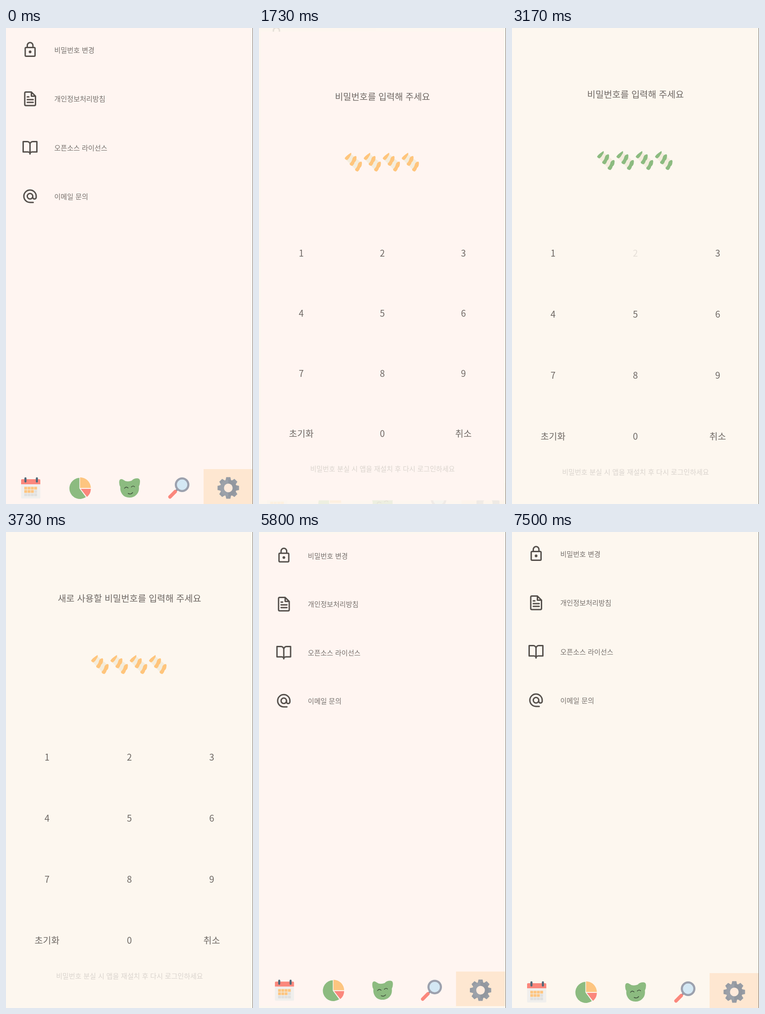
Animation, 540 px wide and 1037 px high, one loop 7530 ms. Source, as an HTML page:

```html
<!DOCTYPE html>
<html lang="ko">
<head>
<meta charset="utf-8">
<style>
html, body { margin: 0; width: 100%; height: 100%; overflow: hidden; background: #fdf7ef; }
svg { display: block; width: 100vw; height: 100vh; }
text { font-family: 'Noto Sans CJK KR', 'Noto Sans CJK JP', 'Noto Sans CJK', sans-serif; fill: #6e6864; }
.row { font-size: 15.2px; fill: #77716d; }
.key, .prompt { font-size: 19.8px; text-anchor: middle; }
.hint { font-size: 15.1px; text-anchor: middle; fill: #dad4ce; }
.line { fill: none; stroke: #55504c; stroke-width: 3; stroke-linejoin: round; stroke-linecap: round; }
</style>
</head>
<body>
<svg viewBox="0 0 540 1037" preserveAspectRatio="none">
  <defs>
    <linearGradient id="steel">
      <stop offset=".5" stop-color="#9ca1a9"/><stop offset=".5" stop-color="#92979f"/>
    </linearGradient>
    <path id="band" d="M25 7Q18 8 17 14Q16 19 11 24Q11 28 17 29Q21 26 22 21Q26 18 26 13Q27 9 25 7Z"/>
  </defs>

  <g id="settings">
    <rect class="bg" width="540" height="1037"/>
    <g class="line">
      <rect x="42" y="42.5" width="21.5" height="19" rx="2"/>
      <path d="M46.5 42V38a6.2 6.2 0 0 1 12.4 0V42"/>
      <circle cx="52.7" cy="52" r="1.5"/>
      <path d="M43.5 139.5H55.5L64.5 148.5V166.5Q64.5 169 62 169H43.5Q41 169 41 166.5V142Q41 139.5 43.5 139.5ZM55.5 140V148.5H64M46.5 150H50M46.5 156H59.5M46.5 162H59.5"/>
      <path transform="translate(34.5 243) scale(1.5)" stroke-width="2" d="M2 3h6a4 4 0 0 1 4 4v14a3 3 0 0 0-3-3H2zM22 3h-6a4 4 0 0 0-4 4v14a3 3 0 0 1 3-3h7z"/>
      <circle cx="52.5" cy="366.5" r="6"/>
      <path d="M59.5 380H52.5A13.5 13.5 0 1 1 66 366.5V368.8a3.75 3.75 0 0 1-7.5 0V366.5"/>
    </g>
    <g id="rows"></g>

    <rect x="432" y="961" width="108" height="76" fill="#fee7d1"/>
    <rect x="33" y="990" width="42" height="35" rx="2" fill="#f0efed"/>
    <path d="M33 994V985q0-2 2-2H73q2 0 2 2V994Z" fill="#fb877c"/>
    <path d="M42.5 981V988M67.5 981V988" stroke="#506878" stroke-width="4.5" stroke-linecap="round"/>
    <g id="days"></g>

    <path d="M160.5 1003V980A23 23 0 1 0 174.5 1022Z" fill="#8cbb80"/>
    <path d="M162 1002V979A23.5 23.5 0 0 1 185.5 1002Z" fill="#fdc580"/>
    <path d="M163.500 1004H185.5A23 23 0 0 1 177 1021.500Z" fill="#fb877c"/>

    <path d="M247.500 991Q247 981 254 983Q258 985 261 987Q268 989 275 986Q279 981 287 981Q293 981 293 988Q293 994 290.500 999Q292 1010 285 1017Q279 1023 270 1023Q258 1023 253 1014Q249 1008 250 1000Q247.500 996 247.500 991Z" fill="#8cbb80"/>
    <path d="M259 1003Q262 998 267 1002M274 1000Q278 996 281 999.500M267 1014Q273 1017 277 1012" fill="none" stroke="#3c4a38" stroke-width="1.4" stroke-linecap="round"/>

    <path d="M375 1005L370 1010" stroke="#8d939e" stroke-width="4"/>
    <path d="M370 1010L358.500 1021.500" stroke="#fb877c" stroke-width="7.500" stroke-linecap="round"/>
    <circle cx="385" cy="995" r="13.7" fill="#d4e8f4" stroke="#9ca1ae" stroke-width="4.600"/>

    <g id="gear" transform="translate(486 1002)"></g>
  </g>

  <g id="keypad">
    <rect class="bg" width="540" height="1037"/>
    <text class="prompt" id="prompt" x="270" y="151.500"></text>
    <g id="chips"></g>
    <g id="keys"></g>
    <text class="hint" x="270" y="973">비밀번호 분실 시 앱을 재설치 후 다시 로그인하세요</text>
  </g>
  <rect x="539" width="1" height="1037" fill="#77726c"/>
</svg>
<script>
const LOOP = 7530, OPEN = 1550, CLOSE = 5620, SLIDE = 400, NEXT = 3300;
const CREAM = '#fdf7ef', PINK = '#fff5f1', GREEN = '#8cbb80', ORANGE = '#ffc57c';
const taps = [
  { key: '2', times: [2300, 2590, 2880, 3160] },
  { key: '1', times: [4570, 4880, 5200, 5480] }
];
const prompts = ['비밀번호를 입력해 주세요', '새로 사용할 비밀번호를 입력해 주세요'];

const $ = id => document.getElementById(id);
const clamp = v => Math.min(1, Math.max(0, v));
const fill = (id, list, draw) => $(id).innerHTML = list.map(draw).join('');

fill('rows', ['비밀번호 변경', '개인정보처리방침', '오픈소스 라이선스', '이메일 문의'],
  (s, i) => `<text class="row" x="105.500" y="${54 + i * 106.4}">${s}</text>`);
fill('days', [...Array(12).keys()], i =>
  `<rect x="${40 + i % 4 * 7.2}" y="${999.5 + (i >> 2) * 7.2}" width="6.300" height="6" fill="${i < 7 ? '#fdc580' : '#e0e0df'}"/>`);
$('gear').innerHTML = [0, 45, 90, 135].map(a =>
  `<path d="M-6 -17L-4.500 -23.500H4.500L6 -17V17L4.500 23.500H-4.500L-6 17Z" fill="#979ca4" transform="rotate(${a})"/>`).join('') +
  '<circle r="18" fill="url(#steel)"/><circle r="9.500" fill="#feeadb"/>';
fill('chips', [0, 1, 2, 3], i => `<g transform="translate(${186 + i * 42.2} 268)">
  <path d="M13 2L37 22L27 40L3 15Z" fill="#f4eddd"/>
  <path d="M0 12Q3 7 14 0Q16 3 12 8Q9 14 5 16Q1 15 0 12Z"/>
  <use href="#band"/><use href="#band" x="12" y="12.500"/></g>`);
fill('keys', ['1', '2', '3', '4', '5', '6', '7', '8', '9', '초기화', '0', '취소'], (s, i) =>
  `<text class="key" x="${89.7 + i % 3 * 180}" y="${497.5 + (i / 3 | 0) * 133.2}">${s}</text>`);

// cubic-bezier(.35, .45, 0, 1)
function glide(x) {
  x = clamp(x);
  if (x === 0 || x === 1) return x;
  const curve = (s, a, b) => 3 * (1 - s) ** 2 * s * a + 3 * (1 - s) * s * s * b + s ** 3;
  let lo = 0, hi = 1;
  for (let i = 0; i < 24; i++) {
    const mid = (lo + hi) / 2;
    if (curve(mid, .35, 0) < x) lo = mid; else hi = mid;
  }
  return curve(lo, .45, 1);
}

function smooth(x) {
  x = clamp(x);
  return x < .5 ? 2 * x * x : 1 - 2 * (1 - x) ** 2;
}

// Keys dim while held and recover after release.
function keyOpacity(t, times) {
  return Math.min(...times.map(r => {
    const dim = t < r ? smooth((t - r + 110) / 110) : 1 - smooth((t - r) / 250);
    return 1 - .84 * dim;
  }));
}

function place(id, scale, opacity, color) {
  const page = $(id);
  page.setAttribute('transform', `translate(270 518.5) scale(${scale}) translate(-270 -518.5)`);
  page.setAttribute('opacity', opacity);
  page.style.display = opacity > 0 ? '' : 'none';
  page.querySelector('.bg').setAttribute('fill', color);
}

function render(t) {
  const color = t < 300 || t > OPEN && t < OPEN + SLIDE || t > CLOSE && t < CLOSE + SLIDE ? PINK : CREAM;
  if (t < CLOSE) {
    const p = glide((t - OPEN) / SLIDE);
    place('settings', 1 + .075 * p, clamp((1 - p) / .7925), color);
    place('keypad', .85 + .15 * p, clamp((p - .75) / .125), color);
  } else {
    const p = glide((t - CLOSE) / SLIDE);
    place('settings', .925 + .075 * p, clamp(p / .7925), color);
    place('keypad', 1 + .075 * p, clamp((.25 - p) / .125), color);
  }

  const step = t < NEXT ? 0 : 1;
  $('prompt').textContent = prompts[step];
  const count = taps[step].times.filter(r => r <= t).length;
  [...$('chips').children].forEach((c, i) => c.setAttribute('fill', i < count ? GREEN : ORANGE));
  for (const { key, times } of taps)
    $('keys').children[key - 1].setAttribute('opacity', keyOpacity(t, times));
}

const start = performance.now();
function tick() {
  render((performance.now() - start) % LOOP);
  requestAnimationFrame(tick);
}
tick();
</script>
</body>
</html>
```
